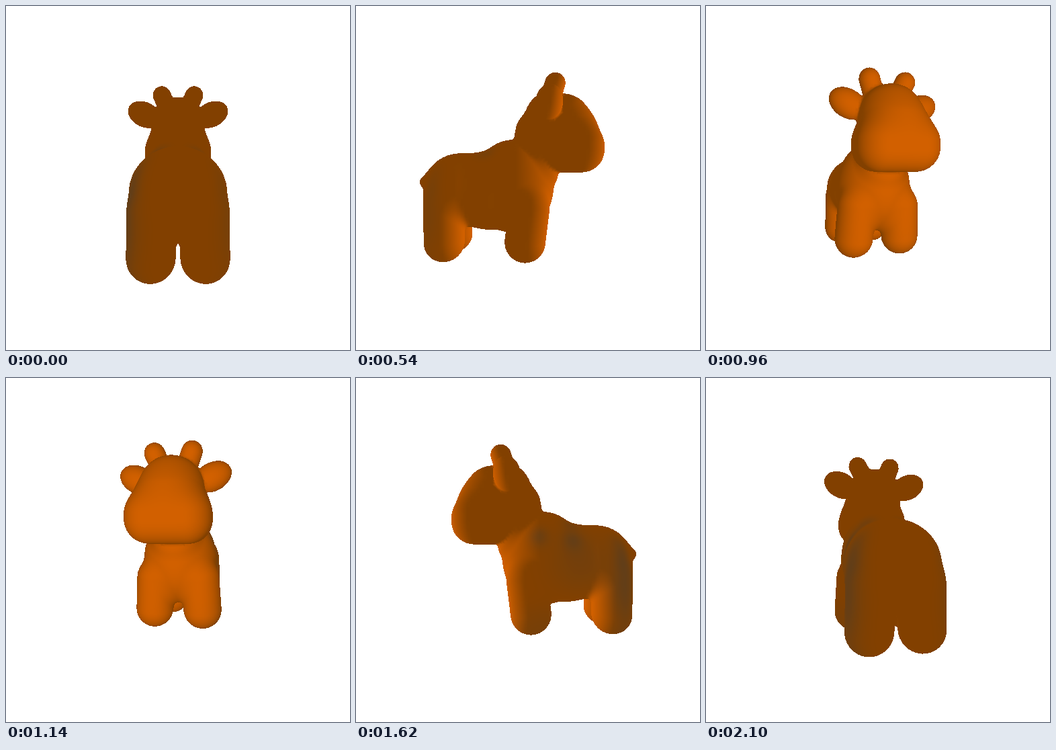
Animation of 512 by 512 pixels, one loop 2160 ms. Source, as an HTML page with a canvas:

```html
<!DOCTYPE html>
<html>
<head>
<meta charset="utf-8">
<title>Turning cow</title>
<style>
html, body { margin: 0; width: 100%; height: 100%; overflow: hidden; background: #fff; }
canvas { display: block; width: 512px; height: 512px; }
</style>
</head>
<body>
<canvas id="stage" width="512" height="512"></canvas>
<script>
const STEPS = 36, STEP_MS = 60, SIZE = 512, EYE = 455;

// --- Distance field of the body (x right, y up, z towards the nose) ---
function ellipsoid(x, y, z, a, b, c) {
  const k0 = Math.hypot(x / a, y / b, z / c);
  const k1 = Math.hypot(x / (a * a), y / (b * b), z / (c * c));
  return k1 < 1e-9 ? -Math.min(a, b, c) : k0 * (k0 - 1) / k1;
}
function capsule(x, y, z, a, b, r) {
  const dx = b[0] - a[0], dy = b[1] - a[1], dz = b[2] - a[2];
  const px = x - a[0], py = y - a[1], pz = z - a[2];
  const t = Math.max(0, Math.min(1, (px * dx + py * dy + pz * dz) / (dx * dx + dy * dy + dz * dz)));
  return Math.hypot(px - dx * t, py - dy * t, pz - dz * t) - r;
}
function roundBox(x, y, z, a, b, c, r) {
  const qx = Math.abs(x) - a, qy = Math.abs(y) - b, qz = Math.abs(z) - c;
  return Math.hypot(Math.max(qx, 0), Math.max(qy, 0), Math.max(qz, 0)) +
    Math.min(0, Math.max(qx, qy, qz)) - r;
}
function blend(a, b, k) {
  const h = Math.max(k - Math.abs(a - b), 0) / k;
  return Math.min(a, b) - h * h * k / 4;
}

const frontLeg = [[36, -87.5, -4], [33, -40, 2]];
const rearLeg = [[30, -88.5, -116], [29, -38, -117]];
const tail = [[0, 5, -138], [0, -6, -151]];
const horn = [[16, 110, 30], [26, 133, 38]];
const neck = [[0, 66, 18], [0, 10, 8]];
const EAR_COS = Math.cos(0.44), EAR_SIN = Math.sin(0.44);

function field(x, y, z) {
  x = Math.abs(x);
  let body = ellipsoid(x, y + 17, z + 100, 56.5, 53.5, 53);
  body = blend(body, ellipsoid(x, y + 18, z + 58, 55.5, 58, 60), 10);
  body = blend(body, ellipsoid(x, y + 12, z + 22, 55.5, 68.5, 60), 6);
  body = blend(body, capsule(x, y, z, ...frontLeg, 28), 10);
  body = blend(body, capsule(x, y, z, ...rearLeg, 27.5), 10);
  body = blend(body, capsule(x, y, z, ...tail, 9.5), 8);

  let head = ellipsoid(x, y - 83, z - 31, 41, 44, 37);
  head = blend(head, ellipsoid(x, y - 82, z - 51, 43, 42, 42), 6);
  head = blend(head, ellipsoid(x, y - 65, z - 62, 47, 44, 42), 6);
  head = blend(head, ellipsoid(x, y - 52, z - 35, 46, 38, 38), 6);
  head = blend(head, roundBox(x, y - 42, z - 66, 24, 3, 10, 31), 12);
  head = blend(head, capsule(x, y, z, ...horn, 14.5), 5);
  const ex = x - 53, ey = y - 100;
  const ear = ellipsoid(ex * EAR_COS + ey * EAR_SIN, ey * EAR_COS - ex * EAR_SIN, z - 28, 27, 19.5, 18);
  head = blend(head, ear, 4);
  head = blend(head, capsule(x, y, z, ...neck, 37), 5);
  return blend(body, head, 4);
}
function normal(x, y, z) {
  const e = 0.6;
  const gx = field(x + e, y, z) - field(x - e, y, z);
  const gy = field(x, y + e, z) - field(x, y - e, z);
  const gz = field(x, y, z + e) - field(x, y, z - e);
  const l = Math.hypot(gx, gy, gz) || 1;
  return [gx / l, gy / l, gz / l];
}

// --- Surface colour; the lamp stands in front of the nose ---
// x, y, z, radius, height radius, strength
const smudges = [
  [-47, -48, -124, 15, 65, 0.85], [45, -48, -126, 14, 55, 0.35],
  [-48, 15, -60, 14, 18, 0.45], [-50, 18, -14, 13, 14, 0.45],
  [-55, -15, -70, 42, 42, 0.3], [-44, -95, -8, 22, 22, 0.4],
  [-28, 36, -60, 14, 12, 0.3], [28, 36, -60, 14, 12, 0.25]
];
function shade(p, n) {
  const lx = -p[0], ly = -p[1], lz = 490 - p[2];
  const lit = Math.max(0, (n[0] * lx + n[1] * ly + n[2] * lz) / Math.hypot(lx, ly, lz));
  let dark = 0;
  for (const [x, y, z, r, h, s] of smudges) {
    dark += s * Math.exp(-((p[0] - x) ** 2 + (p[2] - z) ** 2) / (r * r) - ((p[1] - y) / h) ** 2);
  }
  dark = Math.min(1, dark);
  return [131 + 80 * lit - 48 * dark, 65 + 32 * lit - 4 * dark, 36 * dark];
}

// --- Mesh built once from the field ---
function buildMesh() {
  const G = 4, NX = 44, NY = 72, NZ = 80, origin = [-86, -126, -174];
  const stride = [1, NX, NX * NY];
  const f = new Float32Array(NX * NY * NZ), id = new Int32Array(f.length).fill(-1);
  const verts = [], tris = [];
  const each = fn => {
    for (let k = 0; k < NZ - 1; k++)
      for (let j = 0; j < NY - 1; j++)
        for (let i = 0; i < NX - 1; i++) fn(i, j, k, i + NX * (j + NY * k));
  };
  f.fill(1);
  each((i, j, k, p) => { f[p] = field(origin[0] + i * G, origin[1] + j * G, origin[2] + k * G); });
  each((i, j, k, p) => {
    let inside = 0;
    for (let c = 0; c < 8; c++) {
      if (f[p + (c & 1) + (c >> 1 & 1) * stride[1] + (c >> 2) * stride[2]] < 0) inside++;
    }
    if (inside === 0 || inside === 8) return;
    const v = [i, j, k].map((q, a) => origin[a] + (q + 0.5) * G);
    for (let s = 0; s < 3; s++) {
      const n = normal(...v);
      const d = Math.max(-G, Math.min(G, field(...v)));
      for (let a = 0; a < 3; a++) v[a] -= n[a] * d;
    }
    id[p] = verts.length;
    verts.push({ p: v, c: shade(v, normal(...v)) });
  });
  each((i, j, k, p) => {
    for (let a = 0; a < 3; a++) {
      if ((f[p] < 0) === (f[p + stride[a]] < 0)) continue;
      const b = stride[(a + 1) % 3], c = stride[(a + 2) % 3];
      const q = [id[p], id[p - b], id[p - b - c], id[p - c]];
      tris.push(q[0], q[1], q[2], q[0], q[2], q[3]);
    }
  });
  return { verts, tris };
}

// --- Depth-buffered drawing ---
const mesh = buildMesh();
const ctx = document.getElementById('stage').getContext('2d');
const image = ctx.createImageData(SIZE, SIZE);
const pixels = new Uint32Array(image.data.buffer);
const depth = new Float32Array(SIZE * SIZE);
const count = mesh.verts.length;
const sx = new Float32Array(count), sy = new Float32Array(count), sw = new Float32Array(count);

function fillTriangle(a, b, c) {
  const ax = sx[a], ay = sy[a], bx = sx[b], by = sy[b], cx = sx[c], cy = sy[c];
  const area = (bx - ax) * (cy - ay) - (by - ay) * (cx - ax);
  if (Math.abs(area) < 1e-6) return;
  const x0 = Math.max(0, Math.ceil(Math.min(ax, bx, cx) - 0.5));
  const x1 = Math.min(SIZE - 1, Math.floor(Math.max(ax, bx, cx) - 0.5));
  const y0 = Math.max(0, Math.ceil(Math.min(ay, by, cy) - 0.5));
  const y1 = Math.min(SIZE - 1, Math.floor(Math.max(ay, by, cy) - 0.5));
  const A = mesh.verts[a].c, B = mesh.verts[b].c, C = mesh.verts[c].c;
  for (let y = y0; y <= y1; y++) {
    for (let x = x0; x <= x1; x++) {
      const px = x + 0.5, py = y + 0.5;
      const u = ((bx - px) * (cy - py) - (by - py) * (cx - px)) / area;
      const v = ((cx - px) * (ay - py) - (cy - py) * (ax - px)) / area;
      const w = 1 - u - v;
      if (u < -1e-4 || v < -1e-4 || w < -1e-4) continue;
      const near = u * sw[a] + v * sw[b] + w * sw[c], at = y * SIZE + x;
      if (near <= depth[at]) continue;
      depth[at] = near;
      const mix = i => Math.max(0, u * A[i] + v * B[i] + w * C[i]);
      pixels[at] = (255 << 24 | mix(2) << 16 | mix(1) << 8 | mix(0)) >>> 0;
    }
  }
}

function draw(step) {
  const turn = step / STEPS * Math.PI * 2, cos = Math.cos(turn), sin = Math.sin(turn);
  mesh.verts.forEach(({ p }, i) => {
    const scale = EYE / (EYE + p[2] * cos - p[0] * sin);
    sx[i] = SIZE / 2 + (p[0] * cos + p[2] * sin) * scale;
    sy[i] = SIZE / 2 - p[1] * scale;
    sw[i] = scale;
  });
  pixels.fill(0xffffffff);
  depth.fill(0);
  const t = mesh.tris;
  for (let i = 0; i < t.length; i += 3) fillTriangle(t[i], t[i + 1], t[i + 2]);
  ctx.putImageData(image, 0, 0);
}

let shown = 0;
draw(0);
const start = performance.now();
function tick() {
  const step = Math.floor(Math.max(0, performance.now() - start) / STEP_MS) % STEPS;
  if (step !== shown) draw(shown = step);
  requestAnimationFrame(tick);
}
requestAnimationFrame(tick);
</script>
</body>
</html>
```
